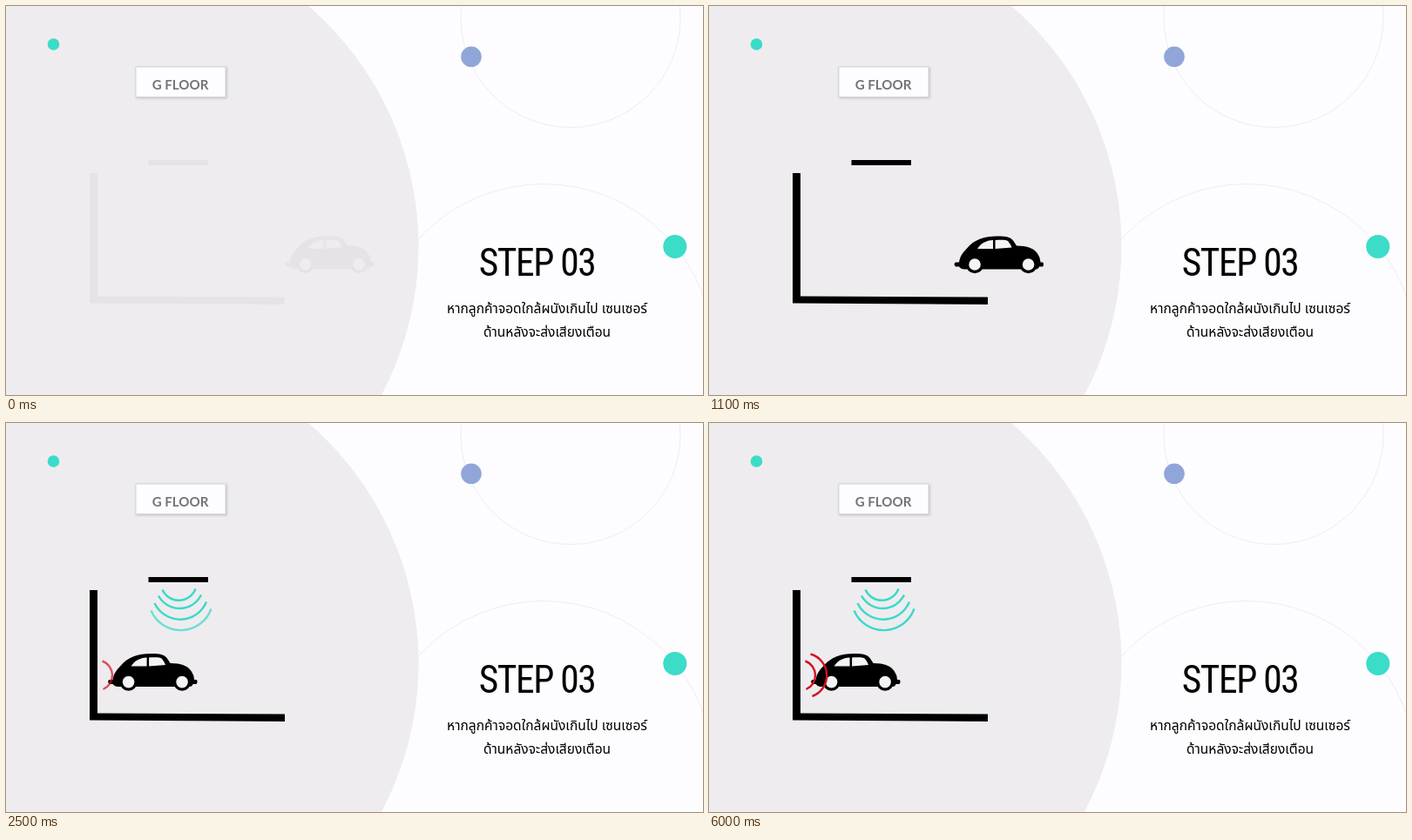
Write an HTML page that moves like this. It is 800 px wide and 447 px high and loops after 6.2 s.

```html
<!DOCTYPE html>
<html lang="th">
<head>
<meta charset="utf-8">
<title>Step 03</title>
<style>
html, body { margin: 0; height: 100%; overflow: hidden; background: #fdfcfe; }
svg { display: block; width: 100vw; height: 100vh; }
text { text-anchor: middle; }
.label { font: bold 15.1px Lato, sans-serif; fill: #767478; }
.title { font: 43.5px "Roboto Condensed", Roboto, sans-serif; font-stretch: 75%; letter-spacing: -1.5px; }
.note { font: 500 15.55px "Noto Sans Thai", "Noto Sans", sans-serif; }
.ring { fill: none; stroke: #ededef; }
.wave { fill: none; stroke-width: 2.4; }
.teal { stroke: #3bdac8; }
.red { stroke: #d5101f; }
.hole { fill: #f4f3f5; }
</style>
</head>
<body>
<svg viewBox="0 0 800 447">
  <rect width="800" height="447" fill="#fdfcfe"/>
  <circle class="ring" cx="648" cy="13.5" r="126"/>
  <circle class="ring" cx="617" cy="399.5" r="195"/>
  <circle cx="109" cy="276" r="364.5" fill="#eeecef"/>
  <circle cx="54.5" cy="44" r="6.8" fill="#3bdcc8"/>
  <circle cx="534" cy="58.3" r="11.8" fill="#90a6d8"/>
  <circle cx="767.8" cy="276.4" r="13.5" fill="#3bdcc8"/>

  <rect x="149" y="70" width="103" height="34.5" fill="#fdfcfe" stroke="#d6d5d8" style="filter:drop-shadow(1px 1.5px 1.5px #0003)"/>
  <text class="label" x="200" y="95.7">G FLOOR</text>
  <text class="title" x="609.5" y="310">STEP 03</text>
  <text class="note" x="621" y="353">หากลูกค้าจอดใกล้ผนังเกินไป เซนเซอร์</text>
  <text class="note" x="621" y="380">ด้านหลังจะส่งเสียงเตือน</text>

  <g id="scene">
    <path d="M96 192h9v141.5L320 334.5v8.5L96 341.5zM163.5 177h68.5v6h-68.5z"/>
    <!-- car, origin at the rear bumper -->
    <g id="car">
      <path d="M2 30H6C7 22 12 17 15 14C23 4 35 0 50 0C60 0 65 1 68 5L72 11C84 11 92 14 96 20Q99 24 99.500 30H102Q104 32 102 35H98Q97 38 94 38H12Q8 38 6 35H2Q-1 32 2 30Z"/>
      <path class="hole" d="M27 14.500C31 8 37 5 45 4.500V14.500ZM47.500 4.500C54 4 60 4 62 5.500Q65 9 66.500 13L47.500 14.500Z"/>
      <g stroke="#000" stroke-width="3.4">
        <circle class="hole" cx="24" cy="32.500" r="8.500"/>
        <circle class="hole" cx="85.500" cy="32.500" r="8.500"/>
      </g>
    </g>
  </g>

  <path class="wave teal" d="M179.500 191.500A20.500 20.500 0 0 0 217.500 190.500"/>
  <path class="wave teal" d="M175 198.500A27.500 27.500 0 0 0 224 197.500"/>
  <path class="wave teal" d="M170.500 207A32.500 32.500 0 0 0 230 205.500"/>
  <path class="wave teal" d="M166.500 215.500A37 37 0 0 0 235.500 213.500"/>
  <path class="wave red" d="M110.500 273.500A17.500 17.500 0 0 1 111.500 306"/>
  <path class="wave red" d="M116.500 265.500A25.500 25.500 0 0 1 118.500 314"/>
</svg>
<script>
const LOOP = 6200, STEP = 100;
const scene = document.getElementById('scene');
const car = document.getElementById('car');
const waves = document.querySelectorAll('.wave');

// start and length of each wave's fade, in ms
const fades = [[1470, 300], [1735, 300], [2000, 300], [2265, 320], [2260, 340], [2750, 550]];

const progress = (t, start, length) => Math.min(1, Math.max(0, (t - start) / length));
const ease = u => u < .5 ? 2 * u * u : 1 - 2 * (1 - u) ** 2;

function draw(now) {
  const t = Math.floor(now % LOOP / STEP) * STEP;
  const drive = ease(progress(t, 530, 1850));
  scene.setAttribute('opacity', progress(t, -25, 700));
  car.setAttribute('transform', `translate(${319.6 - 203 * drive} ${264.3 + .8 * drive})`);
  waves.forEach((wave, i) => wave.setAttribute('opacity', progress(t, ...fades[i])));
  requestAnimationFrame(draw);
}

draw(0);
</script>
</body>
</html>
```
